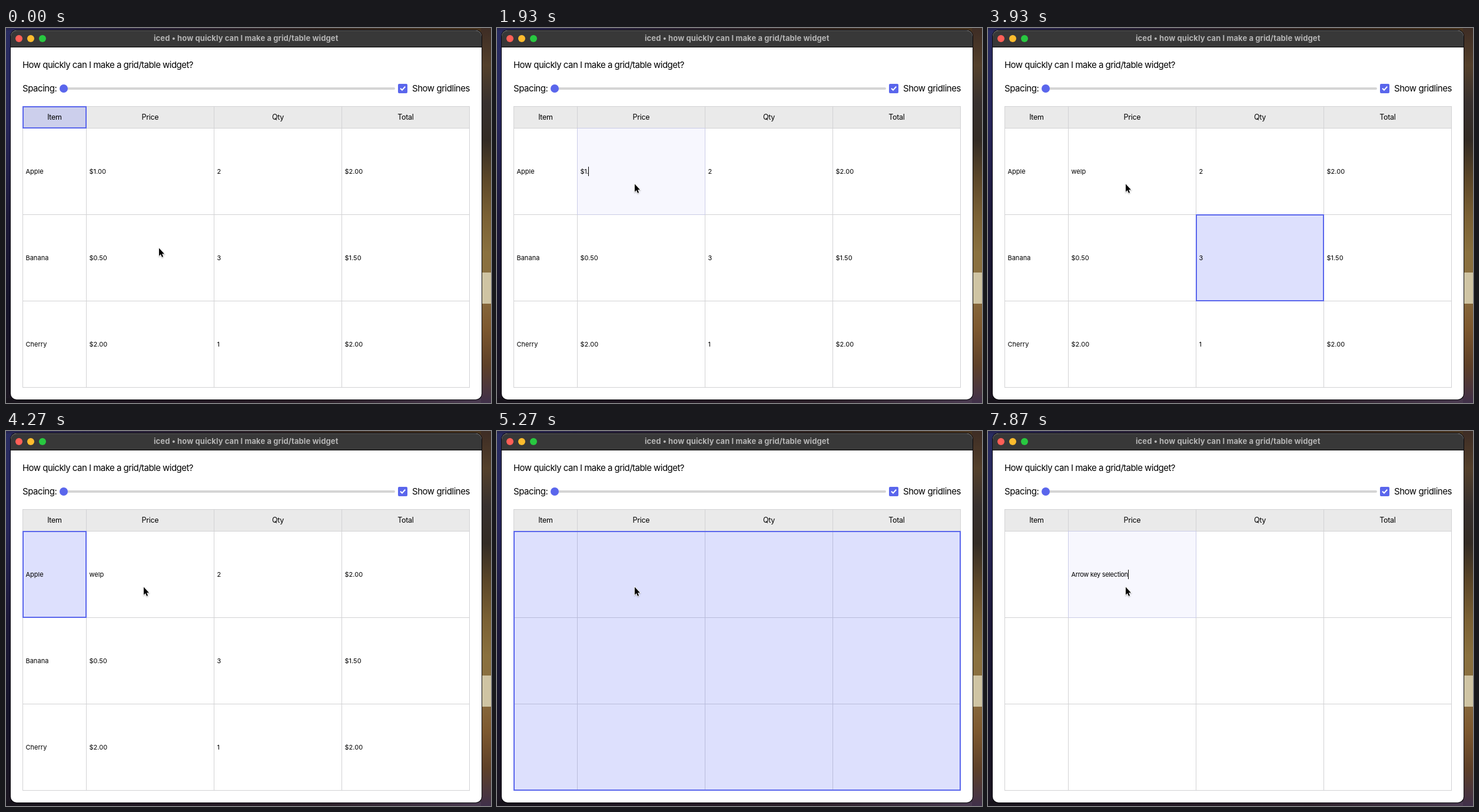
An HTML page with a canvas for the animation above (8 s loop, 824x638 px).

```html
<!DOCTYPE html>
<html lang="en">
<head>
<meta charset="utf-8">
<title>Grid widget</title>
<style>
html, body { margin: 0; width: 100%; height: 100%; overflow: hidden; background: #1a1526; }
canvas { display: block; }
</style>
</head>
<body>
<canvas id="stage" width="824" height="638"></canvas>
<script>
const ctx = document.getElementById('stage').getContext('2d');
const LOOP = 8000, TICKS = 120;
const PRIMARY = '#5a66ec', LINE = '#d2d2d4';
const colX = c => c ? 136 + 217 * (c - 1) : 28;
const rowY = r => r ? 170 + 147 * (r - 1) : 133;
const HEAD = ['Item', 'Price', 'Qty', 'Total'];
const DATA = [
  ['Apple', '$1.00', '2', '$2.00'],
  ['Banana', '$0.50', '3', '$1.50'],
  ['Cherry', '$2.00', '1', '$2.00']
];

// Input runs: first tick, then one key per tick ("·" is a pause).
// ◎ click on the price cell, ⏎ start or end editing, ⌫ erase a letter, ⌦ clear all cells,
// → ← ↑ ↓ move the selection, ⇒ ⇓ extend it.
const INPUT = [
  [16, '◎···⏎'], [27, '⌫·⌫⌫'], [33, '⌫⌫welp'], [42, '⏎'],
  [49, '→→·↓←←←↑→→↓←←↑··⇒····⇓·⇒·⇓·⇒··⌦···◎····⏎'],
  [92, 'Aroo'], [98, '⌫'], [100, '⌫⌫r'], [102, 'row ke'],
  [109, 'y selec'], [115, 'ti'], [116, 'o·n']
];
const MOVES = { '→': [0, 1], '←': [0, -1], '↑': [-1, 0], '↓': [1, 0], '⇒': [0, 1], '⇓': [1, 0] };

function press(s, key) {
  if (key === '·') return;
  if (key === '◎') {
    s.row = s.col = 1;
    s.down = s.across = 0;
  } else if (key === '⏎') s.editing = !s.editing;
  else if (key === '⌫') s.price = s.price.slice(0, -1);
  else if (key === '⌦') {
    s.cleared = true;
    s.price = '';
  } else if (MOVES[key]) {
    const [dr, dc] = MOVES[key];
    if ('⇒⇓'.includes(key)) {
      s.down += dr;
      s.across += dc;
    } else {
      s.row += dr;
      s.col += dc;
    }
  } else s.price += key;
}

function stateAt(t) {
  const tick = Math.floor(t / LOOP * TICKS + .1);
  const s = { row: 0, col: 0, down: 0, across: 0, price: '$1.00', editing: false, cleared: false };
  for (const [start, keys] of INPUT)
    [...keys].forEach((key, i) => start + i <= tick && press(s, key));
  return s;
}

function box(x, y, w, h, color) {
  ctx.fillStyle = color;
  ctx.fillRect(x, y, w, h);
}

function round(x, y, w, h, r, color) {
  ctx.fillStyle = color;
  ctx.beginPath();
  ctx.roundRect(x, y, w, h, r);
  ctx.fill();
}

function dot(x, y, r, color) {
  round(x - r, y - r, 2 * r, 2 * r, r, color);
}

function text(s, x, y, size, spacing, color = '#000', weight = 400, align = 'left') {
  ctx.font = `${weight} ${size}px Inter, sans-serif`;
  ctx.letterSpacing = spacing + 'px';
  ctx.textAlign = align;
  ctx.fillStyle = color;
  ctx.fillText(s, x, y);
}

// Strip with evenly spaced colours along its longer side.
function strip(x, y, w, h, colors) {
  const g = ctx.createLinearGradient(x, y, w > h ? x + w : x, w > h ? y : y + h);
  colors.split(' ').forEach((c, i, all) => g.addColorStop(i / (all.length - 1), '#' + c));
  box(x, y, w, h, g);
}

function drawDesktop() {
  strip(0, 0, 824, 8, '262553 292033 30241f 49351f');
  strip(0, 4, 9, 634, '292c61 27265a 1c1838 151329 1b1520');
  strip(0, 630, 824, 8, '17131b 211722 2c2029 4b3b52');
  strip(807, 0, 17, 638, '3d2c24 54402b 37302e 332b24 5b4628 7a6034 8a713f 8a6d40 7d582f 5e4028 40304a');
  box(807, 416, 17, 53, '#cfc4a3');
}

function drawWindow() {
  round(7, 3, 802, 630, 11, '#08070b');
  round(8, 4, 800, 628, 10, '#fff');
  round(8, 4, 800, 28, [10, 10, 0, 0], '#5a5a5b');
  round(8, 5, 800, 27, [10, 10, 0, 0], '#383838');
  box(8, 32, 800, 1, '#000');
  ['#ff5f57', '#febc2e', '#28c840'].forEach((c, i) => dot(22 + 20 * i, 18, 6, c));
  text('iced • how quickly can I make a grid/table widget', 251, 22, 13, .09, '#b5b5b5', 700);
}

function drawControls() {
  text('How quickly can I make a grid/table widget?', 28, 68, 15, -.53);
  text('Spacing:', 28, 108, 15, -.45);
  round(98, 101, 563, 4, 2, '#d5d5d5');
  dot(98, 103, 7, PRIMARY);
  round(666, 95, 16, 16, 2, PRIMARY);
  ctx.strokeStyle = '#fff';
  ctx.lineWidth = 2.1;
  ctx.stroke(new Path2D('M670 102.7L673 105.6L678.2 99.8'));
  text('Show gridlines', 690, 108, 15, -.45);
}

function drawSelection({ row, col, down, across, editing }) {
  const x = colX(col), y = rowY(row);
  const w = colX(col + across + 1) - x + 1, h = rowY(row + down + 1) - y + 1;
  if (editing) {
    box(x, y, w, h, '#cacce6');
    box(x + 1, y + 1, w - 2, h - 2, '#f7f7fe');
  } else {
    box(x, y, w, h, 'rgba(88,101,242,.2)');
    ctx.strokeStyle = PRIMARY;
    ctx.lineWidth = 2;
    ctx.strokeRect(x + 1, y + 1, w - 2, h - 2);
  }
}

function drawTable(s) {
  box(28, 133, 760, 38, '#eaeaea');
  for (let i = 0; i < 5; i++) {
    box(colX(i), 133, 1, 479, LINE);
    box(28, rowY(i), 760, 1, LINE);
  }
  drawSelection(s);
  HEAD.forEach((label, c) => text(label, (colX(c) + colX(c + 1)) / 2 + .4, 156, 12.5, -.3, '#000', 400, 'center'));
  DATA.forEach((row, r) => row.forEach((value, c) => {
    const price = r === 0 && c === 1, active = price && s.editing;
    const shown = price ? s.price : s.cleared ? '' : value;
    const x = colX(c) + 5.4;
    text(shown, x, 248 + 147 * r, 11, active ? -.33 : .05);
    if (active) box(Math.round(x + ctx.measureText(shown).width), 236, 1, 16, '#000');
  }));
}

function drawCursor(t) {
  const p = Math.min(1, Math.max(0, (t - 70) / 800));
  const e = p * p * (3 - 2 * p);
  const arrow = new Path2D('M0 0V13.2L2.9 10.5L5 15.3L7.1 14.4L5 9.7H9Z');
  ctx.save();
  ctx.translate(260 - 26 * e, 374.5 - 109 * e);
  ctx.shadowColor = 'rgba(0,0,0,.3)';
  ctx.shadowBlur = 2;
  ctx.shadowOffsetY = 1;
  ctx.strokeStyle = '#fff';
  ctx.lineWidth = 1.6;
  ctx.stroke(arrow);
  ctx.shadowColor = 'transparent';
  ctx.fillStyle = '#000';
  ctx.fill(arrow);
  ctx.restore();
}

function draw(now) {
  const t = now % LOOP;
  drawDesktop();
  drawWindow();
  drawControls();
  drawTable(stateAt(t));
  drawCursor(t);
  requestAnimationFrame(draw);
}
requestAnimationFrame(draw);
</script>
</body>
</html>
```
